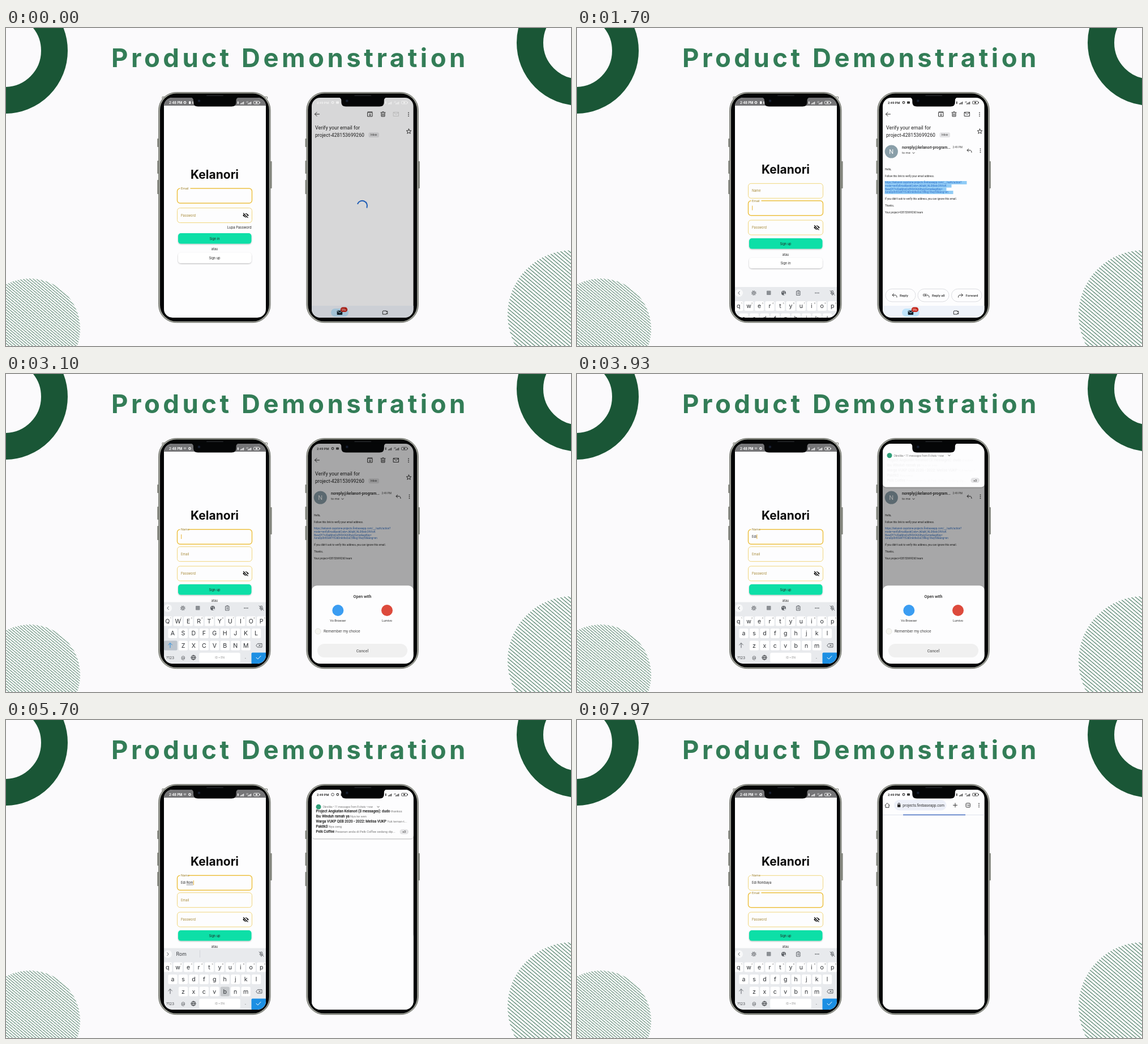
An HTML page for the animation above (8 s loop, 998 px wide and 561 px high).

```html
<!DOCTYPE html>
<html lang="en">
<head>
<meta charset="utf-8">
<title>Product Demonstration</title>
<style>
  html, body { margin: 0; width: 100%; height: 100%; overflow: hidden; background: #fbfafc; }
  svg { display: block; width: 100%; height: 100%; }
  text { font-family: Inter, "Open Sans", sans-serif; white-space: pre; }
  .rb text { font-family: Roboto, "Noto Sans", sans-serif; }
  .mid { text-anchor: middle; }
  .end { text-anchor: end; }
  .b { font-weight: 700; }
  .m { font-weight: 500; }
  .line { fill: none; stroke-width: 1; stroke-linecap: round; stroke-linejoin: round; }
</style>
</head>
<body>
<svg id="stage" viewBox="0 0 998 561" xmlns="http://www.w3.org/2000/svg"></svg>
<script>
const LOOP = 8000;
const FIRST = 'Edi', LAST = 'Rombaya', BRAND = 'Kelanori';
const NAME = `${FIRST} ${LAST}`;
const KEY_TIMES = [3250, 3500, 3750, 4500, 4850, 5150, 5450, 5750, 6050, 6350, 6620];
const FOCUS = { email: 1500, name: 2050, emailAgain: 7400 };
const SUGGEST = [5150, 7300];

// Markup helpers
const rect = (x, y, w, h, r, fill, more = '') =>
  `<rect x="${x}" y="${y}" width="${w}" height="${h}" rx="${r}" fill="${fill}" ${more}/>`;
const circle = (x, y, r, fill, more = '') => `<circle cx="${x}" cy="${y}" r="${r}" fill="${fill}" ${more}/>`;
const text = (x, y, size, str, fill = '#222', cls = '', more = '') =>
  `<text x="${x}" y="${y}" font-size="${size}" fill="${fill}" class="${cls}" ${more}>${str}</text>`;
const icon = (x, y, d, color = '#333', more = '') =>
  `<path class="line" transform="translate(${x} ${y})" d="${d}" stroke="${color}" ${more}/>`;
const during = (spans, body) => `<g data-on="${spans}">${body}</g>`;
const group = (id, body, more = '') => `<g id="${id}" ${more}>${body}</g>`;
const dots = (x, y, dx, dy, color = '#333') =>
  [-1, 0, 1].map(i => circle(x + i * dx, y + i * dy, 0.9, color)).join('');

const ICON = {
  back: 'M4 0H-4M-.5 -3.5L-4 0L-.5 3.5',
  archive: 'M-4 -3H4V4H-4ZM-4 -4H4M0 -1V2.4M-1.5 1L0 2.5L1.5 1',
  trash: 'M-3 -2.5V4H3V-2.5M-4 -3H4M-1 -4.2H1M-1.1 -.8V2.5M1.1 -.8V2.5',
  mail: 'M-4.5 -3.4H4.5V3.5H-4.5ZM-4.5 -3L0 .3L4.5 -3',
  star: 'M0 -4.3L1.2 -1.3L4.3 -1.2L1.9 .8L2.7 3.9L0 2.2L-2.7 3.9L-1.9 .8L-4.3 -1.2L-1.2 -1.3Z',
  reply: 'M-1.4 -3.3L-4 -.8L-1.4 1.7M-4 -.8H1.2Q4 -.8 4 3',
  forward: 'M1.4 -3.3L4 -.8L1.4 1.7M4 -.8H-1.2Q-4 -.8 -4 3',
  video: 'M-3 -3H2.5V-1L4.3 -2.6V2.6L2.5 1V3H-4.2V-1.5Z',
  home: 'M-4 0L0 -4L4 0M-3 -.5V3.8H3V-.5',
  plus: 'M-3.5 0H3.5M0 -3.5V3.5',
  left: 'M1.2 -2.6L-1.2 0L1.2 2.6',
  right: 'M-1.2 -2.6L1.2 0L-1.2 2.6',
  down: 'M-1.6 -.8L0 .8L1.6 -.8',
  shift: 'M0 4V-4M-3.4 -.8L0 -4.2L3.4 -.8',
  erase: 'M-5 0L-2.5 -3.2H5V3.2H-2.5ZM-.5 -1.5L2.5 1.5M2.5 -1.5L-.5 1.5',
  check: 'M-4 0L-1.2 2.8L4 -2.8',
  globe: 'M-4 0A4 4 0 1 1 4 0A4 4 0 1 1 -4 0H4M0 -4Q-3.6 0 0 4Q3.6 0 0 -4',
  mic: 'M-1.3 -3.6H1.3V0H-1.3ZM-3 0Q-2.5 2.4 0 2.4Q2.5 2.4 3 0M0 2.4V4.2M-4 -4L4 4',
  clip: 'M-3 -3.2H3V4H-3ZM-1.2 -4.2H1.2M-1.4 -.6H1.4M-1.4 1.4H1.4',
};

function statusIcons(color) {
  const bars = x => [0, 1, 2, 3].map(i => rect(x + i * 1.7, 133 - i, 1.1, 1.6 + i, 0, color)).join('');
  return rect(409, 129.5, 1.6, 4.5, 0.4, color) + bars(414) + bars(427) +
    text(424, 131.5, 3, '4G', color) +
    rect(437.5, 129.2, 10, 4.8, 1.2, 'none', `stroke="${color}" stroke-width=".8"`) +
    rect(441, 130.5, 3, 2.2, 0, color) + rect(448, 130.6, 1, 2, 0, color);
}
const clock = (time, x, color) => text(x, 133.8, 5.7, time, color, 'b');
const gear = (x, y, color) => circle(x, y, 1.8, 'none', `stroke="${color}" stroke-width="1.2"`);

// Stage decoration
function decoration() {
  const hatch = (id, gap, w) => `<pattern id="${id}" width="${gap}" height="${gap}" patternUnits="userSpaceOnUse"
    patternTransform="rotate(40)">${rect(0, 0, gap, w, 0, '#3d7458')}</pattern>`;
  const ring = (x, y) => circle(x, y, 87.5, 'none', 'stroke="#1a5636" stroke-width="47"');
  return `<defs>${hatch('fine', 3.8, 0.85)}${hatch('wide', 4.9, 1.05)}
      <clipPath id="clipL">${rect(279, 123, 180, 388, 15, '#fff')}</clipPath>
      <clipPath id="clipR">${rect(540, 123, 179.5, 388, 15, '#fff')}</clipPath>
      <filter id="soft" x="-10%" y="-30%" width="120%" height="170%">
        <feDropShadow dx="0" dy="1" stdDeviation="1" flood-color="#000" flood-opacity=".28"/></filter></defs>` +
    rect(0, 0, 998, 561, 0, '#fbfafc') + ring(-2, 40) + ring(1013, 26) +
    circle(42, 531, 89, 'url(#fine)') + circle(1000, 506, 114, 'url(#wide)') +
    text(186, 69, 45.5, 'Product Demonstration', '#337d57', 'b', 'letter-spacing="5.5"');
}

function phoneBody(dx) {
  const button = (x, y, h) => rect(x, y, 2.6, h, 0.8, '#85877f');
  return `<g transform="translate(${dx} 0)">` +
    button(267.2, 195, 15) + button(267.2, 234, 23) + button(267.2, 268, 25) + button(467, 235, 48) +
    rect(269.6, 113.6, 197.4, 406, 31, '#a3a59c', 'stroke="#6a6c66" stroke-width="1"') +
    rect(272, 115.6, 192.8, 402, 29, '#050607') + '</g>';
}
function notch(dx) {
  return `<g transform="translate(${dx} 0)">` +
    '<path d="M326 122.5Q331 123 331 128V131Q331 138.6 339 138.6H398.5Q406.5 138.6 406.5 131V128Q406.5 123 411.5 122.5Z" fill="#050607"/>' +
    rect(354, 118.5, 30, 1.6, 0.8, '#24262a') + circle(341, 128.5, 2.6, '#10151f') +
    circle(341, 128.5, 1, '#26344c') + '</g>';
}

// Left phone
function field(y, label, { focus = false, raised = focus, eye = false } = {}) {
  const w = label.length * 3 + 3;
  return rect(302.5, y, 132, 26, 5, 'none', focus ? 'stroke="#edc143" stroke-width="1.5"' : 'stroke="#f1d67c" stroke-width="1"') +
    (raised ? rect(307.5, y - 2, w, 4, 0, '#fdfdfe') + text(309, y + 2, 5.4, label, '#9c7d22')
            : text(309, y + 15, 5.6, label, '#a58733')) +
    (eye ? `<g transform="translate(423.5 ${y + 13})"><path d="M-5.3 0Q0 -7.4 5.3 0Q0 7.4 -5.3 0Z" fill="#111"/>` +
      circle(0, 0, 2, 'none', 'stroke="#fff"') + '<path d="M-4.2 -4.6L4.6 4.2" stroke="#fff" stroke-width="2.4"/>' +
      '<path d="M-4.4 -4L4 4.4" stroke="#111" stroke-width="1.2"/></g>' : '');
}
const button = (y, label, fill) =>
  rect(304, y, 129.5, 18.6, 5, fill, 'filter="url(#soft)"') + text(368.5, y + 11.6, 5.6, label, '#222', 'mid');
const brand = y => text(368.5, y, 21, BRAND, '#0b0b0b', 'mid b');

const signIn = () => brand(265.5) + field(283, 'Email', { focus: true }) + field(317.5, 'Password', { eye: true }) +
  text(433.5, 354.2, 5.9, 'Lupa Password', '#222', 'end') + button(362, 'Sign in', '#08dfa7') +
  text(368.5, 392.4, 5.5, 'atau', '#222', 'mid') + button(396.3, 'Sign up', '#fff');

function signUp() {
  const { email, name, emailAgain } = FOCUS;
  return brand(256.5) +
    during(`0-${name}`, field(274.3, 'Name')) +
    during(`${name}-${emailAgain}`, field(274.3, 'Name', { focus: true })) +
    during(`${emailAgain}-${LOOP}`, field(274.3, 'Name', { raised: true })) +
    during(`0-${email},${name}-${emailAgain}`, field(304.7, 'Email')) +
    during(`${email}-${name},${emailAgain}-${LOOP}`, field(304.7, 'Email', { focus: true })) +
    field(339, 'Password', { eye: true }) + button(371, 'Sign up', '#08dfa7') +
    text(368.5, 401.8, 5.5, 'atau', '#222', 'mid') + button(405.3, 'Sign in', '#fff') +
    text(309, 289.4, 5.6, '', '#222', '', 'id="typed"') +
    rect(309, 290.6, 0, 0.6, 0, '#444', 'id="underline"') + rect(309, 283, 0.9, 8, 0, '#e6a91c', 'id="caret"');
}

const ROWS = ['qwertyuiop', 'asdfghjkl', 'zxcvbnm'];
const keyX = (row, i) => [285.2, 294.5, 313][row] + i * 18.45;
const keyY = row => 436 + row * 21.4;

function keyboard() {
  const cap = (x, y, w, fill = '#fff') => rect(x - w / 2, y - 8.4, w, 17, 2.5, fill);
  const each = fn => ROWS.map((keys, r) => [...keys].map((k, i) => fn(k, keyX(r, i), keyY(r), r, i)).join('')).join('');
  const letters = upper => each((k, x, y) => text(x, y + 3.8, 10.6, upper ? k.toUpperCase() : k, '#2c2f33', 'mid'));
  const [, , , space, initial] = KEY_TIMES;
  const upperSpans = `${FOCUS.name}-${KEY_TIMES[0]},${space}-${initial}`;
  const lowerSpans = `0-${FOCUS.name},${KEY_TIMES[0]}-${space},${initial}-${LOOP}`;
  const grey = '#5f6368', y4 = keyY(3);
  const tools = icon(286, 413, ICON.left, grey) + gear(312.3, 413, grey) +
    circle(312.3, 413, 3.6, 'none', `stroke="${grey}" stroke-width="1.3" stroke-dasharray="1.6 1.2"`) +
    rect(335, 409, 7.5, 7.5, 1, '#8b8f94') + circle(365, 413, 4, grey) +
    circle(363.5, 411.5, 0.8, '#fff') + circle(366.4, 411.5, 0.8, '#fff') + circle(366.8, 415, 1.5, '#e8eaed') +
    icon(391, 413, ICON.clip, grey) + dots(424, 413, 2.8, 0, grey);
  const suggestions = icon(286, 413, ICON.right, grey) + text(300.5, 416.2, 8.7, '', '#3a3d41', '', 'id="suggest"') +
    rect(342, 406, 0.6, 13, 0, '#c4c7cb') +
    during('6400-7300', text(368, 408.6, 5.3, `${LAST}${FIRST.toLowerCase()}17`, '#333', 'mid m') +
      text(368, 415.2, 4.8, '@surat.test', '#666', 'mid'));
  return rect(279, 402.5, 181, 110, 0, '#e8eaed') + circle(286, 413, 7, '#f8f9fa') +
    during(`0-${SUGGEST[0]},${SUGGEST[1]}-${LOOP}`, tools) + during(SUGGEST.join('-'), suggestions) +
    icon(451, 413, ICON.mic, grey) +
    each((k, x, y) => cap(x, y, 16.2)) + cap(0, 0, 16.2, '#c6c9cc').replace('<rect', '<rect id="press"') +
    each((k, x, y, r, i) => r ? '' : text(x + 5.6, y - 3.6, 3.8, (i + 1) % 10, '#777', 'mid')) +
    during(upperSpans, letters(true) + icon(290, keyY(2), ICON.shift, '#2a8fdd')) +
    during(lowerSpans, letters(false) + icon(290, keyY(2), ICON.shift, grey)) +
    during(`${FOCUS.name}-${KEY_TIMES[0]}`, rect(279, keyY(2) - 8.4, 23.5, 17, 2, '#bcc4cd') +
      icon(290, keyY(2), ICON.shift, '#2a8fdd')) +
    icon(447, keyY(2), ICON.erase, grey) + text(290, y4 + 2.6, 6.6, '?123', '#44474b', 'mid') +
    text(313, y4 + 2.6, 7.6, '@', '#44474b', 'mid') + icon(331, y4, ICON.globe, '#44474b') +
    cap(377.5, y4, 72.5) + text(377.5, y4 + 2, 4.8, 'ID • EN', '#888', 'mid') + text(423, y4 + 2, 8, '.', '#44474b', 'mid') +
    rect(433.5, y4 - 8.6, 27, 20, 2, '#1c8fe3') + icon(446, y4, ICON.check, '#fff');
}

const leftScreen = () => rect(279, 123, 181, 389, 0, '#fdfdfe') +
  during('0-700', signIn()) + during(`700-${LOOP}`, signUp()) + group('keys', keyboard()) +
  rect(279, 123, 181, 14, 0, '#757577') + clock('2:48 PM', 288, '#fff') + statusIcons('#fff') +
  during('0-2000', gear(316, 131.5, '#fff') + rect(323, 129.2, 3.4, 4.8, 0.8, '#fff') + rect(329.5, 129.5, 2, 4.4, 0, '#fff')) +
  during(`2000-${LOOP}`, icon(316, 131.5, 'M-2 -1Q0 -2 2 -1M-1.2 .6Q0 0 1.2 .6', '#ddd') + gear(324.5, 131.5, '#fff'));

// Right phone
function mailBody() {
  const link = [`https://${BRAND.toLowerCase()}-capstone-projects.firebaseapp.com/__/auth/action?`,
    'mode=verifyEmail&amp;oobCode=Jk0qM_NL0XbdcO9VtzK',
    'NwwDY7vAbpMrwGvR9Dr0AA0hwy3smw&amp;apiKey=',
    'AzraDp0tr83eKfY52dDmkthxDaC5Rkig1Rwy50&amp;lang=en'];
  const linkWidth = [145, 118, 109, 121];
  const line = (y, str) => text(544, y, 4.5, str, '#222');
  const reply = (x, w, label, d) => rect(x, 460.3, w, 22.6, 11.3, 'none', 'stroke="#d3d5da" stroke-width=".8"') +
    icon(x + 16, 472, d, '#333') + text(x + 25, 474, 6, label, '#333', 'm');
  return circle(555.3, 218, 11.6, '#8a9fa9') + text(555.3, 222, 11, 'N', '#fff', 'mid') +
    text(574, 212.6, 6.75, `noreply@${BRAND.toLowerCase()}-program...`, '#222', 'm') +
    text(663.5, 212.4, 4.7, '2:49 PM', '#444') + text(574, 222, 5.8, 'to me', '#444') + icon(594.5, 220.5, ICON.down, '#444') +
    icon(693, 216.5, ICON.reply) + dots(712.5, 216.3, 0, 3) +
    line(250.6, 'Hello,') + line(262.6, 'Follow this link to verify your email address.') +
    during('1550-2350', linkWidth.map((w, i) => rect(543.5, 270 + i * 5.7, w, 5.8, 0, '#8fcbf6')).join('')) +
    link.map((s, i) => text(544, 274.2 + i * 5.7, 4.5, s, '#2b6bc4')).join('') +
    line(303, "If you didn't ask to verify this address, you can ignore this email.") +
    line(315, 'Thanks,') + line(326.6, 'Your project-428153699260 team') +
    reply(545, 53, 'Reply', ICON.reply) + reply(602, 55, 'Reply all', ICON.reply) +
    icon(615, 472, 'M-1.4 -3.3L-4 -.8L-1.4 1.7') + reply(661.5, 53.5, 'Forward', ICON.forward);
}

const mailApp = () => icon(549.5, 152, ICON.back) + icon(643, 152, ICON.archive) + icon(666, 152, ICON.trash) +
  during('0-450', icon(689, 152, ICON.mail, '#d8d8d8')) + during(`450-${LOOP}`, icon(689, 152, ICON.mail)) +
  dots(711, 152.3, 0, 3) + text(546, 179, 8.9, 'Verify your email for') + text(546, 191.8, 8.6, 'project-428153699260') +
  rect(640.5, 184.3, 18.5, 8.6, 2.5, '#e4e4e6') + text(649.7, 190.4, 4.7, 'Inbox', '#444', 'mid') +
  icon(711.5, 182.3, ICON.star) + during(`450-${LOOP}`, mailBody()) +
  rect(540, 490, 180, 22, 0, '#eff3fa') + rect(574, 495, 31, 14, 7, '#bfe4fb') +
  rect(584.6, 498.5, 9.6, 7.4, 1, '#14232e') + icon(589.4, 502, 'M-4 -2.6L0 .4L4 -2.6', '#bfe4fb') +
  rect(590.8, 492.4, 12.4, 8.6, 4.3, '#c5281c') + text(597, 498.6, 4.6, '99+', '#fff', 'mid') +
  icon(669.5, 502, ICON.video);

function openWith() {
  const app = (x, color, label) => during('0-2750', circle(x, 417, 10.5, '#f5f5fb')) +
    during(`2750-${LOOP}`, circle(x, 417, 10, color) + text(x, 437, 5.5, label, '#333', 'mid'));
  return rect(540, 373.3, 180, 150, 9, '#fdfdfe') + text(629.5, 394.8, 7.1, 'Open with', '#222', 'mid m') +
    app(586.3, '#3b9df2', 'Vo Browser') + app(673, '#dd4a3c', 'Lumivo') +
    circle(551, 454, 5, '#f6f6f1', 'stroke="#dededa" stroke-width=".8"') + text(561, 456.4, 6.7, 'Remember my choice', '#444') +
    rect(550, 476, 159, 24, 12, '#f0f0f0') + text(629.5, 490.6, 7, 'Cancel', '#666', 'mid m');
}

const browser = () => rect(540, 123, 180, 389, 0, '#fdfdfe') + during(`5500-${LOOP}`,
  icon(548, 150.5, ICON.home) + rect(560, 141, 92.5, 18.4, 9.2, '#edf0f9') +
  rect(566, 149.3, 5.4, 4.4, 0.7, '#222') + icon(568.7, 149, 'M-1.6 .5V-1Q-1.6 -2.4 0 -2.4Q1.6 -2.4 1.6 -1V.5', '#222') +
  text(649, 152.8, 6.5, 'projects.firebaseapp.com', '#333', 'end') + icon(668, 150.3, ICON.plus) +
  rect(687, 146.8, 7.4, 7.2, 1.4, 'none', 'stroke="#333"') + text(690.7, 152.2, 4.2, '10', '#333', 'mid b') +
  dots(710, 150.3, 0, 3) + group('progress', rect(540, -0.4, 180, 0.8, 0, '#d9dde8') +
    rect(540, -0.7, 0, 1.4, 0, '#3a64bd', 'id="bar"')));

function headsUp() {
  const rows = [[`Project Angkatan ${BRAND} (3 messages): dudo`, 'thankss'], ['Ibu Winduh ramah ya', 'Nya ke wen'],
    ['Warga VUKP QEB 2020 - 2022: Melisa VUKP', 'Yuk teman-t...'], ['Paklik3', 'Nya ceng'],
    ['Pelk Coffee', 'Pesanan anda di Pelk Coffee sedang dip...']];
  return rect(540, 60, 180, 149, 6, '#fdfdfe', 'filter="url(#soft)"') + circle(552, 153.2, 4.5, '#2f9e78') +
    text(559.5, 155, 4.65, 'Obrolika • 11 messages from 8 chats • now', '#777') + icon(657.5, 153.3, ICON.down, '#555') +
    group('rows', rows.map(([who, what], i) => `<text x="547.5" y="${163 + i * 9.05}" font-size="6.3" fill="#222">` +
      `<tspan class="m" stroke="#222" stroke-width=".12">${who}</tspan><tspan font-size="5.7" fill="#777"> ${what}</tspan></text>`).join('')) +
    rect(695.5, 192.8, 15.5, 8.6, 4.3, '#e3e3e5') + text(703.2, 199, 4.7, '+3', '#333', 'mid m');
}

const rightStatus = color => clock('2:49 PM', 549, color) + `<g transform="translate(261 0)">${statusIcons(color)}</g>`;
const rightScreen = () => rect(540, 123, 180, 389, 0, '#fdfdfe') + mailApp() +
  rect(540, 123, 180, 389, 0, '#000', 'id="dim"') +
  during('0-450', '<path id="spinner" class="line" d="M-8.3 -3A8.8 8.8 0 0 1 8 3.6" stroke="#1f5db5" style="stroke-width:2"/>') +
  group('sheet', openWith()) + group('browser', browser()) + group('headsUp', headsUp()) +
  during('0-350', rightStatus('#f1f1f1') + gear(577, 131.5, '#f1f1f1') + rect(583, 129.6, 5, 4, 0.8, '#f1f1f1')) +
  during(`350-3800,4150-${LOOP}`, rightStatus('#333')) +
  during(`350-3800,6250-${LOOP}`, gear(577, 131.5, '#333') + rect(583, 129.6, 5, 4, 0.8, '#333')) +
  during('4150-6250', circle(577, 131.5, 2.4, 'none', 'stroke="#333" stroke-width=".8"') + gear(585.8, 131.5, '#333') +
    rect(591.5, 129.5, 2, 4.4, 0, '#333'));

const bracket = 'M276 125V121.5H281M457 121.5H461.5V125';
document.getElementById('stage').innerHTML = decoration() +
  `<path d="${bracket}" fill="none" stroke="#77786f" stroke-width="1"/>` +
  phoneBody(0) + phoneBody(261.3) +
  `<g clip-path="url(#clipL)">${leftScreen()}</g><g class="rb" clip-path="url(#clipR)">${rightScreen()}</g>` +
  notch(0) + notch(261.3);

// Motion
const $ = id => document.getElementById(id);
const set = (id, attrs) => { for (const k in attrs) $(id).setAttribute(k, attrs[k]); };
const ramp = (t, from, to) => Math.min(1, Math.max(0, (t - from) / (to - from)));
const smooth = p => p * p * (3 - 2 * p);
const easeOut = p => 1 - (1 - p) ** 3;
const shift = (id, y) => set(id, { transform: `translate(0 ${y})` });
const timed = [...document.querySelectorAll('[data-on]')].map(el =>
  ({ el, spans: el.dataset.on.split(',').map(s => s.split('-').map(Number)) }));

function typing(t) {
  const count = KEY_TIMES.filter(k => k <= t).length;
  const typed = $('typed'), value = NAME.slice(0, count);
  if (typed.textContent !== value) typed.textContent = value;
  $('suggest').textContent = value.slice(FIRST.length + 1);

  const width = count ? typed.getComputedTextLength() : 0;
  const composing = count > FIRST.length + 1 && t < SUGGEST[1];
  const start = composing ? typed.getSubStringLength(0, FIRST.length + 1) : 0;
  set('underline', { x: 309 + start, width: composing ? width - start : 0 });

  const inName = t >= FOCUS.name && t < FOCUS.emailAgain;
  const last = Math.max(0, ...Object.values(FOCUS).concat(KEY_TIMES).filter(k => k <= t));
  const lit = t >= FOCUS.email && (t - last) % 1000 < 500;
  set('caret', { x: inName ? 309.3 + width : 309.3, y: inName ? 283 : 313.5, opacity: lit ? 1 : 0 });

  const next = NAME[count], row = next ? ROWS.findIndex(r => r.includes(next.toLowerCase())) : -1;
  const pressed = row >= 0 && KEY_TIMES[count] - t < 90;
  set('press', { opacity: pressed ? 1 : 0 });
  if (pressed) set('press', { x: keyX(row, ROWS[row].indexOf(next.toLowerCase())) - 8.1, y: keyY(row) - 8.4 });
}

function render(t) {
  for (const { el, spans } of timed)
    el.style.display = spans.some(([a, b]) => t >= a && t < b) ? '' : 'none';
  typing(t);
  shift('keys', 110 * (1 - smooth(ramp(t, 1560, 1840))));

  set('dim', { opacity: 0.15 * (1 - ramp(t, 250, 450)) + 0.34 * ramp(t, 2400, 2820) });
  set('spinner', { transform: `translate(629.5 313) rotate(${t * 0.28})` });
  shift('sheet', 140 * (1 - easeOut(ramp(t, 2330, 2600))));
  set('browser', { opacity: ramp(t, 4280, 4430) });
  shift('headsUp', -90 * (1 - easeOut(ramp(t, 3720, 4120))) - 95 * smooth(ramp(t, 5950, 6250)));
  set('headsUp', { opacity: t > 3720 && t < 6250 ? 1 : 0 });
  set('rows', { opacity: 0.03 + 0.97 * ramp(t, 3930, 4150) });

  const tail = 36 * ramp(t, 7400, 7970), head = Math.max(0, 34 + (t - 6770) * 0.0933);
  shift('progress', 163 + 4.4 * ramp(t, 6900, 7100));
  set('bar', { x: 540 + tail, width: Math.max(0, head - tail) });
}

const begin = performance.now();
function tick() {
  render((performance.now() - begin) % LOOP);
  requestAnimationFrame(tick);
}
tick();
</script>
</body>
</html>
```
